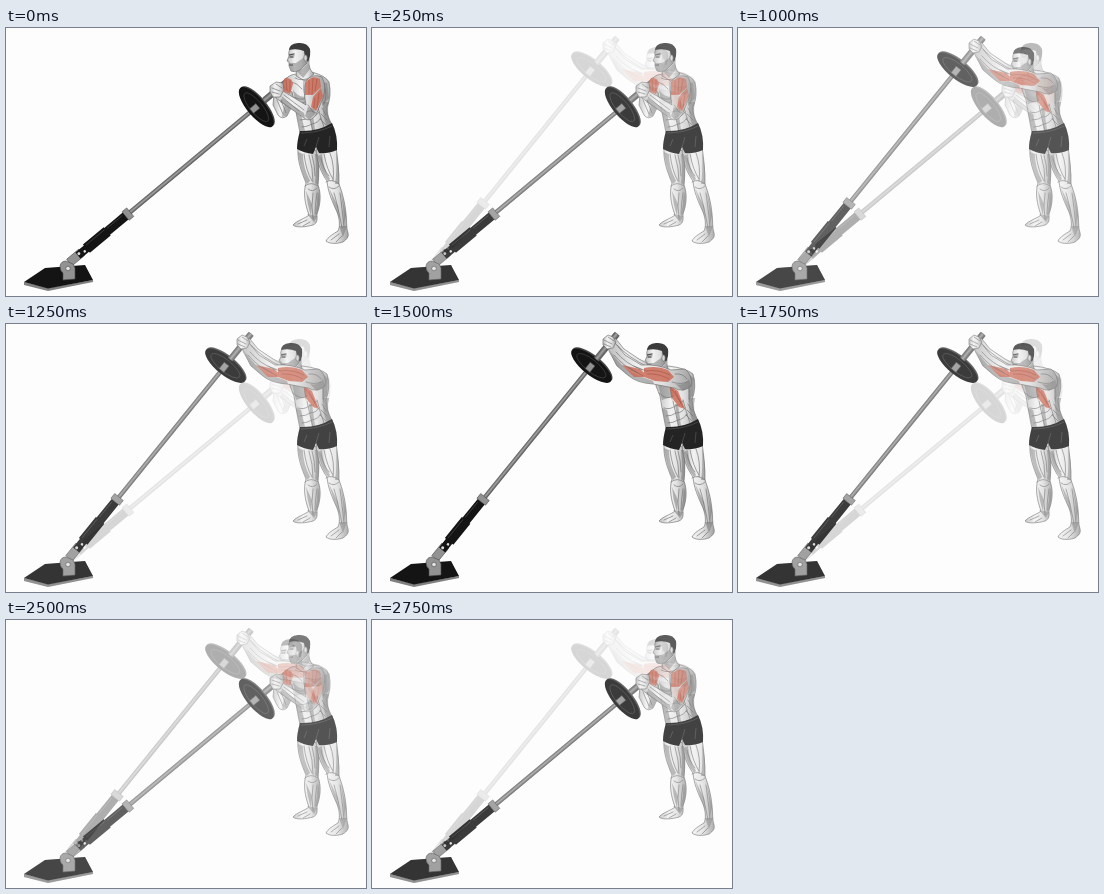
These frames come from a looping animation (360x268 px, 3 s). An HTML page:

```html
<!DOCTYPE html>
<html lang="en">
<head>
<meta charset="utf-8">
<title>Landmine press</title>
<style>
  html, body { margin: 0; width: 100%; height: 100%; overflow: hidden; background: #fdfdfd; }
  svg { display: block; width: 100%; height: 100%; }
  .skin { fill: url(#skin); stroke: #666; stroke-width: .6; stroke-linejoin: round; }
  .line { fill: none; stroke: #707070; stroke-width: .65; stroke-linecap: round; }
  .shade { fill: #707070; opacity: .48; }
  .red { fill: #cc6b57; opacity: .85; }
  .fiber { fill: none; stroke: #8f3c30; stroke-width: .6; opacity: .65; }
  .steel { fill: #929292; stroke: #4c4c4c; stroke-width: .6; }
  .dark { fill: #141414; }
</style>
</head>
<body>
<svg viewBox="0 0 360 268">
  <defs>
    <linearGradient id="skin">
      <stop offset="0" stop-color="#bdbdbd"/>
      <stop offset=".35" stop-color="#f2f2f2"/>
      <stop offset=".65" stop-color="#e2e2e2"/>
      <stop offset="1" stop-color="#a2a2a2"/>
    </linearGradient>
    <linearGradient id="rod" x2="0" y2="1">
      <stop offset="0" stop-color="#555"/>
      <stop offset=".45" stop-color="#a2a2a2"/>
      <stop offset="1" stop-color="#4c4c4c"/>
    </linearGradient>

    <g id="base">
      <path fill="#808080" d="M18 254 42 260 87 252V254L42 263 18 257Z"/>
      <path class="dark" d="M18 254 39 240 79 237 87 252 42 260.500Z"/>
    </g>

    <g id="bracket">
      <path class="steel" d="M54 238Q55 233 60 233L67 236 69 240V251L57 252V245Q54 243 54 238Z"/>
      <circle cx="62" cy="240.500" r="2.300" fill="#e2e2e2" stroke="#555" stroke-width=".7"/>
    </g>

    <!-- Bar and plate lie along the x axis with the pivot at the origin -->
    <g id="bar">
      <rect x="80" y="-2.200" width="208" height="4.400" fill="url(#rod)"/>
      <path class="steel" d="M2-4.500H18V4H2Z"/>
      <path class="dark" d="M13-4H24V-5.500H51V-4.500H75V4.500H51V5.500H24V4H13Z"/>
      <path d="M26-3H50M53-2.500H73" stroke="#484848" stroke-width=".7"/>
      <circle cx="15" cy="-1" r="1.500" fill="#ddd"/>
      <circle cx="21" cy="1" r="1.300" fill="#ddd"/>
      <rect class="steel" x="75" y="-5.500" width="6" height="11"/>
    </g>
    <g id="plate">
      <ellipse cx="1.500" rx="9" ry="25" fill="#444"/>
      <ellipse class="dark" rx="9" ry="25"/>
      <ellipse rx="6" ry="18" fill="none" stroke="#3c3c3c" stroke-width=".8"/>
      <rect class="steel" x="-6" y="-3" width="8" height="6"/>
    </g>
    <rect id="grip" x="255" y="-3" width="33" height="6" rx="1" fill="url(#rod)" stroke="#555" stroke-width=".5"/>

    <g id="legs">
      <path class="skin" d="M292 120C291 133 296 145 300 155 297 165 299 176 303 187 300 190 290 193 287 197 290 200 300 199 307 197 312 195 311 190 311 186 315 175 315 165 312 157 313 148 313 136 312 123Z"/>
      <path class="skin" d="M310 121C311 136 316 146 321 153 322 164 326 173 331 184 334 192 334 199 332 203 327 206 322 209 320 213 325 217 334 215 337 214 341 211 343 209 342 205 340 199 341 193 340 186 339 174 336 164 333 156 333 144 332 132 330 119Z"/>
      <path class="shade" d="M292 124Q295 145 301 156L304 153Q297 140 297 126ZM309 126Q311 144 309 155L312 157Q314 140 312 126ZM300 163Q301 176 305 188L306 176ZM312 163Q311 177 309 188L311 186Q315 174 312 163ZM312 128Q315 145 322 153L324 151Q317 140 316 126ZM330 124Q331 145 329 156L333 156Q334 138 330 124ZM323 160Q327 176 334 192L332 178ZM335 164Q338 180 338 197L340 187ZM301 186 311 188 308 194ZM333 198 341 198 337 209Z"/>
      <path class="line" d="M298 126Q300 143 306 153M303 127Q307 140 307 154M306 127Q309 137 309 148M299 158Q305 153 312 158M302 161Q307 165 311 160M307 165Q305 178 307 191M311 165Q309 177 309 186M292 196 301 192M297 198 304 194M318 126Q321 142 327 151M324 125Q329 138 327 153M315 130Q317 141 323 148M320 154Q326 150 333 156M323 159Q328 163 333 158M328 165Q332 178 336 200M334 165Q336 179 338 199M325 212 333 206M330 214 336 208"/>
    </g>

    <g id="shorts">
      <path fill="#242424" d="M294 103Q311 104 326 95 332 107 331 122 321 126 313 125L310 119 307 126Q298 125 291 121 291 113 294 103Z"/>
      <path d="M295 105Q312 105 326 98M310 119 313 109M298 118 301 111M323 119 324 108" fill="none" stroke="#555" stroke-width=".7"/>
    </g>

    <g id="head">
      <path class="skin" d="M291 37 290 48 299 53 308 46Q302 41 303 31Z"/>
      <path class="shade" d="M291 43Q298 41 302 34L304 41 297 50Z"/>
      <path class="skin" d="M284 20Q282 25 283 28L281 33 283 34 283 38 285 43Q289 45 294 42L301 35 303 23Q294 16 284 20Z"/>
      <path class="shade" d="M283 35 290 35 300 28 301 35 294 42Q288 45 285 43ZM283 26 289 25 288 30 283 30Z"/>
      <path fill="#3b3b3b" d="M283 22Q283 16 292 15 301 14 304 21 305 28 302 34L299 29 298 23Q291 20 283 22Z"/>
      <path d="M283 27 288 26M284 29H287M283 37 287 37" stroke="#444" stroke-width=".9"/>
      <ellipse cx="299.500" cy="30" rx="1.700" ry="3" fill="#d5d5d5" stroke="#666" stroke-width=".6"/>
    </g>

    <g id="abs">
      <path class="shade" d="M317 74Q316 89 321 98L326 96Q320 86 323 74ZM290 84 294 103 299 103 295 86ZM303 80 306 103 309 102 306 80Z"/>
      <path class="line" d="M301 77Q304 91 307 104M292 84Q298 86 303 82 308 82 311 77M294 92Q300 92 304 89 310 89 313 84M296 99Q301 99 306 96 312 95 315 90M311 76Q314 88 318 99M316 80 320 87M315 86 321 92M314 91 320 97"/>
    </g>
  </defs>

  <g id="lowered">
    <use href="#base"/>
    <g transform="translate(62 236) rotate(-39.800)">
      <use href="#bar"/>
      <use href="#plate" x="245"/>
      <use href="#grip"/>
    </g>
    <use href="#bracket"/>
    <use href="#legs"/>
    <path class="skin" d="M290 46Q280 47 277 56L284 70 290 84 294 105Q313 105 326 97 320 87 321 79 326 68 323 54 320 48 306 44L298 49Z"/>
    <use href="#abs"/>
    <use href="#shorts"/>
    <use href="#head"/>
    <path class="shade" d="M287 62Q294 71 301 68L301 77 290 77ZM316 54 321 55 323 70 316 78Z"/>
    <path class="line" d="M289 50Q296 54 307 49M298 53Q297 62 299 70M286 54Q291 55 296 61M288 69Q295 73 300 70M291 77 299 74M318 58Q322 66 318 76"/>
    <path class="skin" d="M268 66 276 60 286 64 288 74 281 88Q276 92 272 87L267 77Z"/>
    <path class="shade" d="M280 70 287 72 281 88 276 89Z"/>
    <path class="red" d="M279 50Q286 49 287 56L284 66 278 64Q275 55 279 50Z"/>
    <path class="skin" d="M300 53Q306 45 316 49 321 58 317 70L310 87Q304 95 298 90L270 70 268 64 273 60 280 65 300 77Q297 62 300 53Z"/>
    <path class="shade" d="M302 79 299 88 303 92 309 86 308 81ZM276 70 298 85 299 90 274 74Z"/>
    <path class="red" d="M299 55Q306 46 314 51L315 59 307 67 299 67ZM307 69 315 60 317 68 310 83 305 79Z"/>
    <path class="fiber" d="M303 52 303 66M307 50 306 66M311 51 309 63M309 70 308 80M313 65 311 80M280 52 281 63M284 52 284 63"/>
    <path class="line" d="M278 67 298 82M276 69 293 83M302 77 308 85M301 84Q305 81 310 85M271 72 277 86M275 72 280 85"/>
    <path class="skin" d="M264 58 270 54 277 55 278 62 274 69 267 69 264 64Z"/>
    <path class="line" d="M266 60 274 63M266 64 273 66M270 56 276 60"/>
  </g>

  <g id="raised">
    <use href="#base"/>
    <g transform="translate(62 236) rotate(-51)">
      <use href="#bar"/>
      <use href="#plate" x="250"/>
      <use href="#grip" x="3"/>
    </g>
    <use href="#bracket"/>
    <use href="#legs"/>
    <path class="skin" d="M238 14 244 15 252 25 267 35 281 42 284 52 270 50 253 39 241 27Z"/>
    <path class="line" d="M245 21Q257 34 276 43M244 25Q257 38 271 46"/>
    <path class="skin" d="M284 48 284 62Q289 71 290 84L294 105Q313 105 326 97 320 86 320 76 325 62 321 50 314 44 296 42Z"/>
    <use href="#abs"/>
    <use href="#shorts"/>
    <use href="#head" x="-8" y="4"/>
    <path class="shade" d="M286 60 300 63 302 72 290 76ZM316 50 322 54 321 72 316 76Z"/>
    <path class="red" d="M297 61 306 67 313 85 307 83 300 74Z"/>
    <path class="line" d="M287 69Q295 77 301 72M299 62Q298 68 300 75M314 57Q320 65 317 78"/>
    <path class="skin" d="M236 17 243 19 253 31 269 41Q286 40 299 46L313 45Q321 51 319 62 311 69 302 64L281 60Q265 59 257 52L245 42 237 27Z"/>
    <path class="shade" d="M238 27Q248 41 260 49L281 57 282 60Q265 59 254 50L244 41ZM304 60Q313 62 317 55L319 62 311 67Z"/>
    <path class="red" d="M272 44Q285 41 296 46L302 53 296 58 283 57 272 53ZM250 41 268 45 277 53 262 53Z"/>
    <path class="fiber" d="M274 47Q286 45 298 51M275 50Q286 49 297 55M256 43 271 52M300 65 309 79M303 67 311 83"/>
    <path class="line" d="M244 28Q254 40 270 46M242 31Q252 43 266 49M303 50Q311 49 315 55M300 58Q309 61 315 58M262 42 274 47"/>
    <path class="skin" d="M231 15 236 11 241 13 244 18 241 24 235 25 231 21Z"/>
    <path class="line" d="M232 16 240 20M232 20 239 23M236 13 242 17"/>
  </g>
</svg>
<script>
  const lowered = document.getElementById("lowered");
  const raised = document.getElementById("raised");
  const STEP = 250, STEPS = 12, HALF = STEPS / 2;

  // Both poses crossfade in equal steps, up and back down.
  function draw(now) {
    const step = Math.floor(now / STEP) % STEPS;
    const mix = 1 - Math.abs(step - HALF) / HALF;
    lowered.style.opacity = 1 - mix;
    raised.style.opacity = mix;
    requestAnimationFrame(draw);
  }
  draw(0);
</script>
</body>
</html>
```
